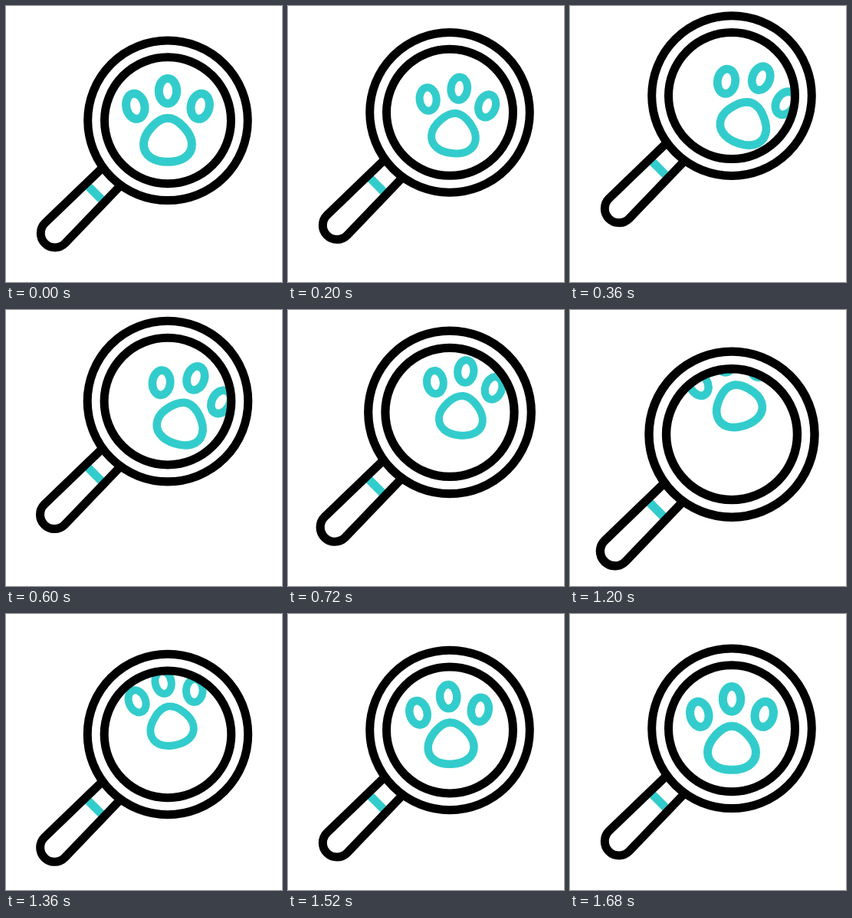
An HTML page for the animation above (2000 ms loop, 360x360 px).

```html
<!DOCTYPE html>
<html lang="en">
<head>
<meta charset="utf-8">
<title>Paw search</title>
<style>
  html, body { margin: 0; height: 100%; overflow: hidden; background: #fff; }
  svg { display: block; width: 100%; height: 100%; }
  g { fill: none; stroke-width: 11; }
  .teal { stroke: #3cc; }
  .black { stroke: #000; }
</style>
</head>
<body>
<svg viewBox="0 0 360 360">
  <clipPath id="lens"><circle id="lensArea" r="82"/></clipPath>
  <g clip-path="url(#lens)">
    <g id="paw" class="teal">
      <ellipse cx="-42.2" cy="-18.5" rx="12" ry="16.7" transform="rotate(-12 -42.2 -18.5)"/>
      <ellipse cy="-38.5" rx="11.7" ry="16.4"/>
      <ellipse cx="42.2" cy="-18.5" rx="12" ry="16.7" transform="rotate(12 42.2 -18.5)"/>
      <path d="M0-3C14-3 31.5 17 31.5 31C31.5 46 18 54 0 54S-31.5 46-31.5 31C-31.5 17-14-3 0-3Z"/>
    </g>
  </g>
  <g id="glass" class="black">
    <circle r="104.3"/>
    <circle r="82.5"/>
    <g transform="rotate(135)">
      <path class="teal" d="M134-13V13"/>
      <path d="M102-16.4L208-18.6a18.6 18.6 0 0 1 0 37.2L102 16.6"/>
    </g>
  </g>
</svg>
<script>
const LOOP = 2000, STEP = 40;
const [paw, glass, lensArea] = ['paw', 'glass', 'lensArea'].map(id => document.getElementById(id));

function place(el, x, y, angle, scale) {
  el.setAttribute('transform',
    `translate(${211 + x} ${149.3 + y}) rotate(${angle}) scale(${scale})`);
}

function draw(now) {
  const t = Math.floor(now % LOOP / STEP) * STEP;
  const ease = (from, to) => {
    const p = Math.min(1, Math.max(0, (t - from) / (to - from)));
    return p * p * (3 - 2 * p);
  };
  // Shrinks to 0.9 halfway through a move, then recovers
  const dip = (from, to) => {
    const mid = (from + to) / 2;
    return 0.1 * (ease(from, mid) - ease(mid, to));
  };
  const up = ease(75, 420), down = ease(500, 1020), back = ease(1080, 1660);
  const pawBack = ease(1080, 1620);

  const y = -35 * up + 49.5 * down - 14.5 * back;
  const zoom = 1 + 0.05 * (down - ease(1080, 1420));
  place(glass, 0, y, 0, zoom);
  place(lensArea, 0, y, 0, zoom);

  place(paw,
    27.5 * up - 26.5 * down - pawBack,
    -21.7 * up - 33.3 * down + 55 * pawBack,
    22 * up - 42 * down + 20 * back,
    1 - dip(75, 420) - dip(500, 1020) - dip(1080, 1660));
}

const start = performance.now();
function tick() {
  draw(performance.now() - start);
  requestAnimationFrame(tick);
}
tick();
</script>
</body>
</html>
```
